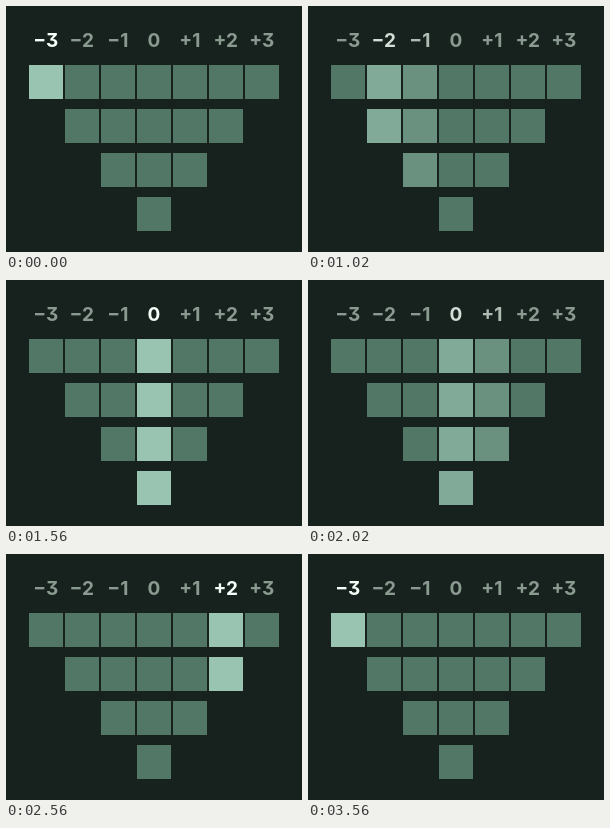
Write an HTML page that moves like this. It is 296 by 246 pixels and loops after 3580 ms.

```html
<!DOCTYPE html>
<html lang="en">
<head>
<meta charset="utf-8">
<title>Column highlight</title>
<style>
html, body { margin: 0; width: 100%; height: 100%; overflow: hidden; background: #17221f; }
svg { display: block; width: 296px; height: 246px; }
text { font: 700 19px Inter, "Open Sans", sans-serif; font-feature-settings: "cv09"; text-anchor: middle; }
</style>
</head>
<body>
<svg id="stage" viewBox="0 0 296 246"></svg>
<script>
const LOOP = 3580, HOLD = 500, FIRST = 520, STEP = 20;
const COLUMNS = 7, PITCH = 36, ROW = 44, SIZE = 34;
const CELL = [[82, 119, 102], [154, 196, 178]];
const LABEL = [[139, 154, 144], [245, 255, 248]];
const stage = document.getElementById('stage');

function add(parent, tag, attrs) {
  const el = document.createElementNS('http://www.w3.org/2000/svg', tag);
  for (const key in attrs) el.setAttribute(key, attrs[key]);
  return parent.appendChild(el);
}

const mix = ([from, to], amount) =>
  `rgb(${from.map((v, i) => Math.round(v + (to[i] - v) * amount))})`;

const columns = Array.from({ length: COLUMNS }, (_, i) => {
  const n = i - 3, x = 23 + i * PITCH;
  const label = add(stage, 'text', { x: x + 16.8, y: 41 });
  label.textContent = (n < 0 ? '−' : n > 0 ? '+' : '') + Math.abs(n);
  const cells = add(stage, 'g', {});
  for (let row = 0; row < 4 - Math.abs(n); row++)
    add(cells, 'rect', { x, y: 59 + row * ROW, width: SIZE, height: SIZE });
  return { label, cells };
});

function draw(now) {
  const t = now % LOOP;
  const active = Math.max(0, Math.floor((t - FIRST) / HOLD));
  // Each handover takes three hard steps of a third.
  const since = t - FIRST - active * HOLD;
  const fade = since < 0 ? 0 : Math.min(3, Math.floor(since / STEP) + 1) / 3;
  const next = (active + 1) % COLUMNS;
  columns.forEach(({ label, cells }, i) => {
    const glow = i === active ? 1 - fade : i === next ? fade : 0;
    label.setAttribute('fill', mix(LABEL, glow));
    cells.setAttribute('fill', mix(CELL, glow));
  });
}

const start = performance.now();
function tick() {
  draw(performance.now() - start);
  requestAnimationFrame(tick);
}
tick();
</script>
</body>
</html>
```
